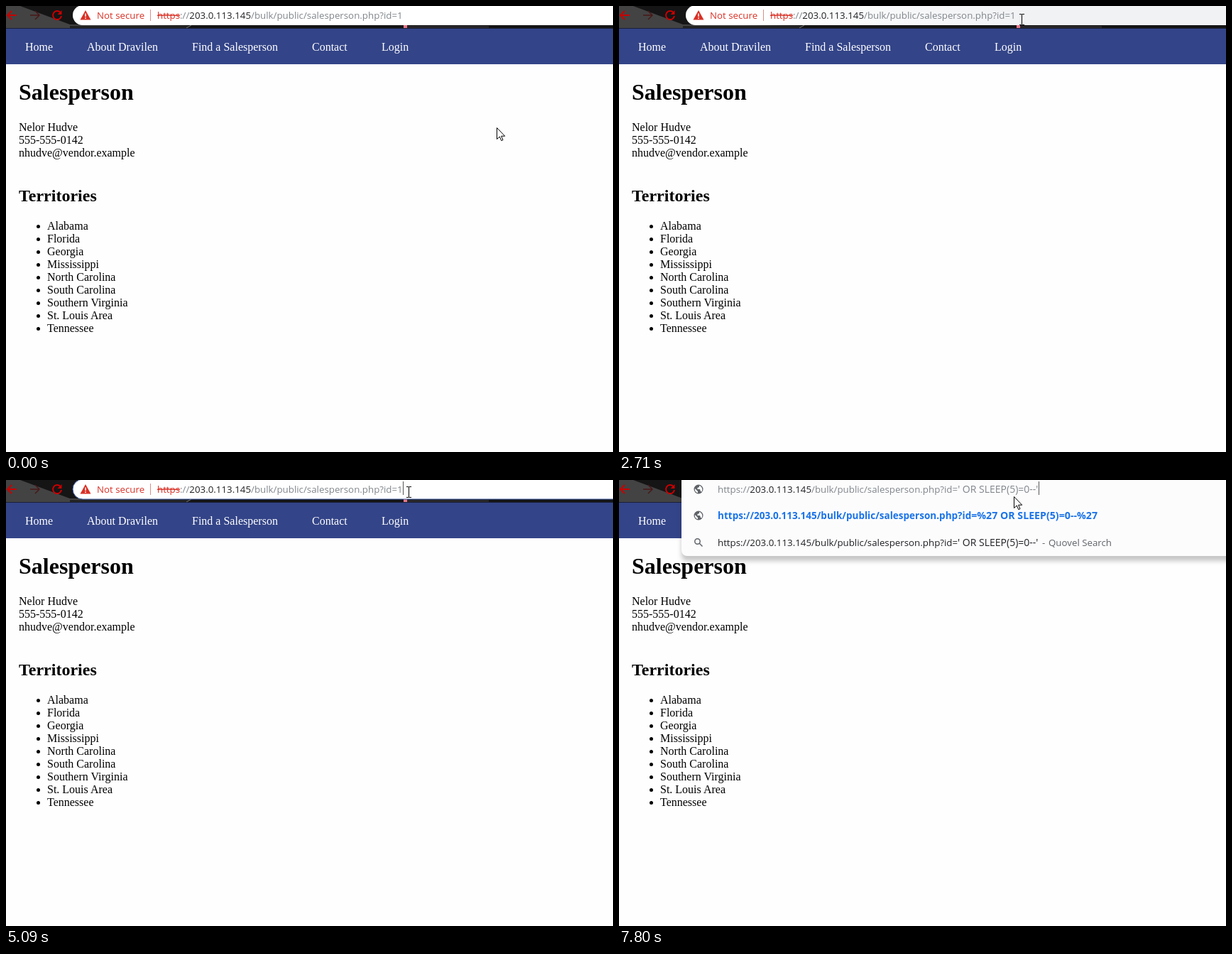
Write an HTML page that moves like this. It is 855 by 628 pixels and loops after 8 s.

```html
<!DOCTYPE html>
<html lang="en">
<head>
<meta charset="utf-8">
<title>Salesperson</title>
<style>
html, body { margin: 0; width: 100%; height: 100%; overflow: hidden; background: #fefefe; }
svg { display: block; width: 855px; height: 628px; }
text { white-space: pre; }
.page { font: 16px "Liberation Serif", "Times New Roman", serif; }
.ui { font: 13.3px "Open Sans", "Noto Sans", sans-serif; fill: #202124; }
.grey { fill: #80868b; }
.struck { fill: #d93025; text-decoration: line-through; }
.hit { font-size: 13.54px; font-weight: 700; fill: #1a73e8; }
.thin { font-size: 14px; font-weight: 400; }
.wide { font-size: 14px; }
.hit .wide { font-size: 14.2px; }
.panel { filter: drop-shadow(0 7px 3px rgba(0, 0, 0, .22)); }
</style>
</head>
<body>
<svg viewBox="0 0 855 628">
  <defs>
    <linearGradient id="dim"><stop offset=".1" stop-color="#fff"/><stop offset=".6" stop-color="#f1f2f4"/></linearGradient>
    <g id="globe">
      <circle r="6.5" fill="#5f6368"/>
      <path d="M-5 -1L-1 3V5C-4 4.600 -5.500 2 -5 -1ZM1 -5V-3L-1.500 -2V0H2L3 3 4.500 3.500C6 1 5.500 -4 1 -5Z" fill="#fff"/>
    </g>
    <g id="lens" fill="none" stroke="#5f6368" stroke-width="1.5">
      <circle cx="-1.500" cy="-1.500" r="3.700"/><path d="M1.300 1.300L5.500 5.500"/>
    </g>
  </defs>

  <g class="page" id="page"></g>

  <g id="toolbar">
    <path d="M0 0H855V32H0Z" fill="#151516"/>
    <path d="M0 0H20L90 26 260 28 254 31H0Z" fill="#434343"/>
    <path d="M90 28H260L255 31H90Z" fill="#242425"/>
    <path d="M261 27L254 31" stroke="#777"/>
    <path d="M565 28H680V31H565Z" fill="#29272a"/>
    <path d="M560 27h5v4h-5z" fill="#e8788c"/>
    <path d="M0 31.500H855" stroke="#1a1f38"/>
    <g fill="none" stroke="#c80000" stroke-width="2">
      <path d="M15 13H2M8 7L2 13 8 19"/>
      <path d="M34 13H46M41 7L47 13 41 19" stroke="#4a1818" stroke-width="1.5"/>
      <path d="M76.500 9A6 6 0 1 0 78 14"/>
      <path d="M78.500 6V12H72.500Z" fill="#c80000" stroke="none"/>
    </g>
  </g>

  <g class="ui" id="bar">
    <rect id="box" x="94" y="-1" width="800" height="28" rx="14"/>
    <path d="M112 6L119.500 19.500H104.500Z" fill="#d93025"/>
    <path d="M112 10.500V15M112 16.300V18" stroke="#fff" stroke-width="1.500"/>
    <text x="128" y="18" fill="#d93025">Not secure</text>
    <path d="M203.500 5V21" stroke="#df8c86"/>
    <g id="plain"></g>
    <g id="all"></g>
    <g id="one"><path d="M552 2h7v22h-7z" fill="#3399ff"/><text x="551.600" y="18" fill="#fff">1</text></g>
  </g>

  <g class="ui" id="drop1"></g>
  <g class="ui" id="drop2"></g>
  <path id="caret" d="M.5 2V21" stroke="#555"/>

  <g id="arrow"><path d="M.5 .5V16.500L4.300 13 6.800 18.600 9 17.600 6.600 12.200H11.700Z" fill="#fff" stroke="#000"/></g>
  <g id="beam" fill="none" stroke="#000">
    <circle id="ring" cx=".5" cy="8" r="10" fill="#fff" fill-opacity=".6"/>
    <path d="M-3 .5H0L.5 1 1 .5H4M.5 1V15M-3 15.500H0L.5 15 1 15.500H4"/>
  </g>
</svg>
<script>
const $ = id => document.getElementById(id);
const HOST = '203.0.113.145', PATH = '/bulk/public/salesperson.php?id';
const PROBE = "' OR SLEEP(5)=0--'", CODED = '=%27 OR SLEEP(5)=0--%27';

const text = (x, y, s, attrs = '') => `<text x="${x}" y="${y}" ${attrs}>${s}</text>`;
const span = (cls, s) => `<tspan class="${cls}">${s}</tspan>`;
const icon = (id, y) => `<use href="#${id}" x="112" y="${y}"/>`;

// Page content
const nav = [[27, 'Home'], [114, 'About Dravilen'], [262, 'Find a Salesperson'], [431, 'Contact'], [529, 'Login']];
const contact = ['Nelor Hudve', '555-555-0142', 'nhudve@vendor.example'];
const areas = ['Alabama', 'Florida', 'Georgia', 'Mississippi', 'North Carolina', 'South Carolina',
  'Southern Virginia', 'St. Louis Area', 'Tennessee'];
$('page').innerHTML = '<path d="M0 31H855V82H0Z" fill="#334488"/>' +
  nav.map(([x, s]) => text(x, 63, s, 'fill="#fff"')).join('') +
  text(18, 132, 'Salesperson', 'font-size="32" font-weight="700"') +
  contact.map((s, i) => text(18, 176 + 18 * i, s)).join('') +
  text(18, 275, 'Territories', 'font-size="24" font-weight="700"') +
  areas.map((s, i) => `<circle cx="45.500" cy="${310.5 + 18 * i}" r="2.500"/>` + text(58, 315 + 18 * i, s)).join('');

// Address bar
$('plain').innerHTML = text(213, 18, span('struck', 'https') + span('grey', '://') + HOST + span('grey', PATH + '=1'));
$('all').innerHTML = '<path d="M213 2H559V24H213Z" fill="#3399ff"/>' +
  text(213, 18, `<tspan text-decoration="line-through">https</tspan>://${HOST}${PATH}=1`, 'fill="#fff"');

// Suggestion lists
const full = 'https://' + HOST + PATH;
const panel = (bottom, fill) =>
  `<rect class="panel" x="88" y="-20" width="800" height="${bottom + 20}" rx="8" fill="${fill}"/>`;
const typed = extra => icon('globe', 13) +
  text(139, 18, span('grey', 'https://') + HOST + span('grey', PATH + '=' + span('wide', extra)));
const hit = (y, tail) => icon('globe', y - 5) + text(139, y, full + tail, 'class="hit"');
const search = (y, extra, x) => icon('lens', y - 5) + text(139, y, full + '=' + span('wide', extra)) +
  text(x, y, '-', 'fill="#5f6368"') + text(x + 9, y, 'Quovel Search', 'fill="#5f6368"');

$('drop1').innerHTML = panel(145, '#fff') + '<path d="M88 31H855V69H88Z" fill="#f1f1f2"/>' + typed('') +
  hit(55, span('thin', '=')) + hit(93, span('thin', '=1')) + search(131, '', 483);
$('drop2').innerHTML = panel(107, '#fcfcfd') + typed(PROBE) + hit(55, span('wide', CODED)) + search(93, PROBE, 596);

// [time, pointer, x, y]
const moves = [
  [0, 'arrow', 691, 171], [130, 'arrow', 708, 97], [280, 'arrow', 707, 75], [430, 'arrow', 694, 50],
  [550, 'beam', 645, 9], [670, 'beam', 595, 1], [790, 'beam', 569, 2], [2160, 'beam', 568, 8],
  [2310, 'beam', 567, 11], [3140, 'arrow', 575, 32], [3260, 'arrow', 579, 44], [3410, 'arrow', 581, 46],
  [3560, 'arrow', 582, 54], [4150, 'arrow', 581, 24], [4270, 'beam', 579, 6], [4840, 'beam', 573, 6],
  [5090, 'beam', 567, 9], [5220, 'beam', 562, 12], [5520, 'beam', 548, 12], [5670, 'beam', 546, 15],
  [5820, 'arrow', 550, 18], [5950, 'arrow', 556, 23]
];
// [time, mode, caret x, click ring]
const modes = [
  [0, 'rest'], [940, 'edit', 559, 1], [1070, 'all'], [2710, 'dim'], [4540, 'edit', 559, 1], [4690, 'all'],
  [5090, 'edit', 559], [5520, 'one'], [6510, 'drop1', 478], [7060, 'drop1'], [7500, 'drop1', 478],
  [7800, 'drop2', 591]
];

const at = (table, t) => table.findLast(row => row[0] <= t);
const show = (id, on) => $(id).setAttribute('visibility', on ? 'inherit' : 'hidden');
const place = (id, x, y) => $(id).setAttribute('transform', `translate(${x} ${y})`);

function draw() {
  const t = performance.now() % 8000;
  const [, pointer, x, y] = at(moves, t);
  const [, mode, caret, ring] = at(modes, t);
  for (const id of ['arrow', 'beam']) show(id, id === pointer);
  place(pointer, x, y);
  show('ring', ring && pointer === 'beam');
  for (const id of ['all', 'one', 'drop1', 'drop2']) show(id, id === mode);
  show('plain', mode !== 'all');
  show('caret', caret);
  if (caret) place('caret', caret, 0);
  const focused = mode !== 'rest' && mode !== 'dim';
  $('box').setAttribute('fill', mode === 'dim' ? 'url(#dim)' : '#fff');
  $('box').setAttribute('stroke', focused ? '#3a569f' : 'none');
  requestAnimationFrame(draw);
}
draw();
</script>
</body>
</html>
```
